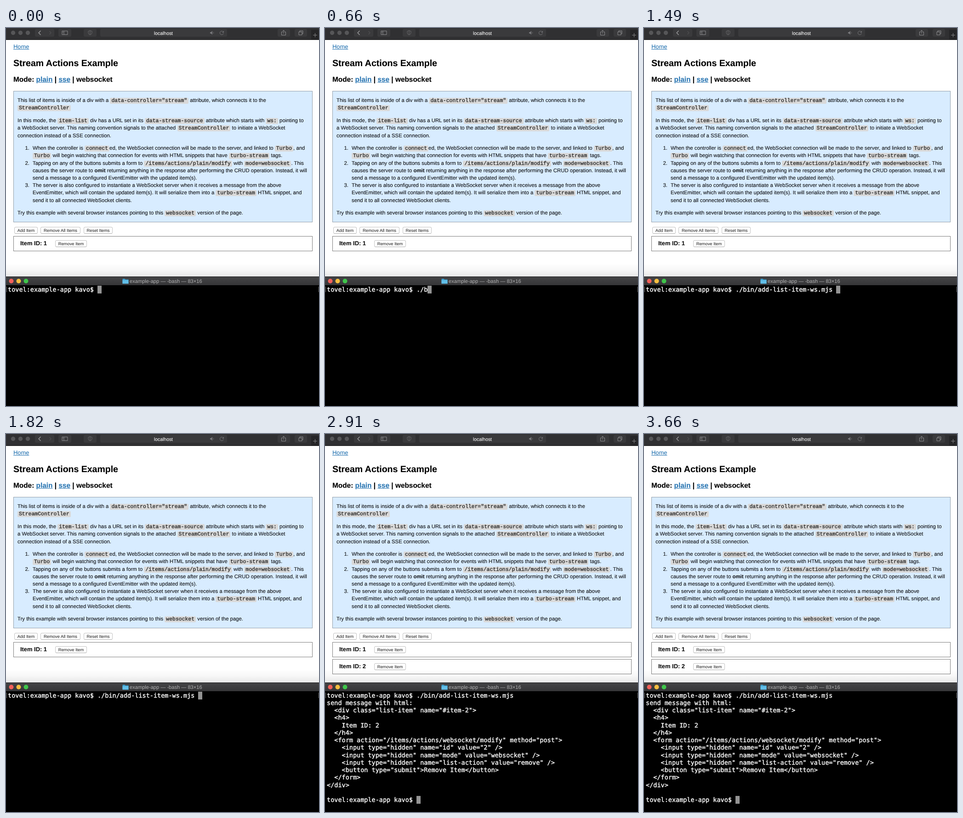
An HTML page that plays this animation: 681 by 823 pixels, repeating every 3.75 s.

```html
<!DOCTYPE html>
<html lang="en">
<head>
<meta charset="utf-8">
<title>Stream Actions Example</title>
<style>
  html, body { margin: 0; width: 100%; height: 100%; overflow: hidden; background: #fff; }
  body {
    position: relative;
    font: 11.36px/16px "Liberation Sans", Arial, sans-serif;
    color: #121416;
    text-rendering: geometricPrecision;
  }
  .stage { position: absolute; left: 0; top: 0; width: 681px; height: 823px; overflow: hidden; }
  .stage * { box-sizing: border-box; }
  .bar { position: absolute; left: 0; top: 0; }

  /* Rows are centred on --y */
  .row {
    position: absolute; left: calc(var(--x, 25) * 1px); top: calc(var(--y) * 1px - 8px);
    height: 16px; white-space: pre; -webkit-text-stroke: .12px;
  }
  .li { --x: 58; }
  .li i { position: absolute; left: -16.5px; font-style: normal; }
  .head { --x: 16; color: #000; font-weight: bold; }
  a { color: #2b77b3; text-decoration: underline; }
  code {
    font: 11.45px/16px "Liberation Mono", "Courier New", monospace;
    -webkit-text-stroke: .35px;
    padding: 0 3px; border-radius: 2px; background: #d9d9d9; color: #2a2a2a;
  }
  .panel {
    position: absolute; left: 16px; top: 137px; width: 651px; height: 286px;
    border: 1px solid #93a0aa; background: #d8ecff;
  }
  .item {
    position: absolute; left: 16px; top: 453px; width: 651px; height: 33px;
    border: 1px solid #7d7d7d; background: #fff;
  }
  .item b { position: absolute; left: 14px; top: 7px; font-size: 12.9px; color: #000; white-space: pre; }
  .btn {
    position: absolute; top: 433px; height: 15px; border: 1px solid #c3c3c3; border-bottom-color: #acacac;
    border-radius: 3.5px; background: #fff; color: #1a1a1a; font-size: 9.4px; line-height: 13px;
    text-align: center; white-space: nowrap;
  }
  .item .btn { left: 90px; top: 8px; width: 69px; }
  .shade {
    position: absolute; left: 0; top: 512px; width: 100%; height: 30px;
    background: linear-gradient(#0000, #00000008 50%, #00000018);
  }

  .title {
    position: absolute; left: 0; top: 541px; width: 100%; height: 19px;
    background: linear-gradient(#434345, #363638); border-top: 1px solid #1b1b1c;
  }
  .title span { position: absolute; left: 269px; top: 2px; font-size: 11.1px; color: #b4b4b5; white-space: pre; }
  .term {
    --w: 8.127px; --h: 16.27px;
    position: absolute; left: 0; top: 560px; width: 100%; height: 263px;
    background: #000; color: #fff;
    font: 13.5px/16.27px "DejaVu Sans Mono", monospace;
    -webkit-text-stroke: .4px;
    animation: type 3750ms step-end infinite;
  }
  .term pre { position: absolute; left: 4px; top: 1.5px; margin: 0; font: inherit; }
  .term .cmd {
    left: calc(4px + 24 * var(--w)); width: calc(var(--n) * var(--w));
    height: var(--h); overflow: hidden;
  }
  .term .out { top: calc(1.5px + var(--h)); }
  .cursor {
    position: absolute; width: 9px; height: 17px; background: #939393;
    left: calc(4px + var(--col) * var(--w)); top: calc(.5px + var(--row) * var(--h));
  }
  .mark { position: absolute; top: 3px; width: 1px; height: 12px; background: #6a6a6a; }
  .done { animation: done 3750ms step-end infinite; }

  @keyframes type {
    0%     { --n: 0;  --col: 24; --row: 0; }
    10.93% { --n: 1;  --col: 25; --row: 0; }
    13.33% { --n: 2;  --col: 26; --row: 0; }
    17.45% { --n: 3;  --col: 27; --row: 0; }
    19.73% { --n: 4;  --col: 28; --row: 0; }
    22.13% { --n: 5;  --col: 29; --row: 0; }
    26.67% { --n: 6;  --col: 30; --row: 0; }
    30.8%  { --n: 7;  --col: 31; --row: 0; }
    39.73% { --n: 27; --col: 51; --row: 0; }
    55.2%  { --n: 27; --col: 0;  --row: 1; }
    59.47%, 100% { --n: 27; --col: 24; --row: 14; }
  }
  @keyframes done {
    0% { visibility: hidden; }
    59.47%, 100% { visibility: visible; }
  }
</style>
</head>
<body>
<div class="stage">
  <svg class="bar" width="681" height="26" fill="none" stroke="#8d8d8f" stroke-width="1">
    <rect width="681" height="26" fill="#303032" stroke="none"/>
    <path d="M0 25.5H681" stroke="#151516"/>
    <g fill="#565658" stroke="none">
      <circle cx="15.5" cy="10.5" r="4.7"/><circle cx="31.5" cy="10.5" r="4.7"/><circle cx="47.5" cy="10.5" r="4.7"/>
    </g>
    <g fill="#3a3a3c" stroke="none">
      <rect x="63" y="2" width="42" height="17" rx="3"/><rect x="114" y="2" width="28" height="17" rx="3"/>
      <rect x="169" y="2" width="28" height="17" rx="3"/><rect x="205" y="2" width="276" height="17" rx="3"/>
      <rect x="591" y="2" width="27" height="17" rx="3"/><rect x="628" y="2" width="27" height="17" rx="3"/>
    </g>
    <path d="M75.5 6l-4.5 4.5 4.5 4.5" stroke="#a5a5a7" stroke-width="1.2"/>
    <path d="M94.5 7l3.5 3.5-3.5 3.5" stroke="#5f5f61"/>
    <path d="M122 6.5h12v8h-12zM126 6.5v8M123.5 8.5h1M123.5 10.5h1"/>
    <path d="M183 5.5l4 1.5v3.5q0 3-4 4.5q-4-1.5-4-4.5v-3.5zM183 5.5v9.5" stroke="#68686a"/>
    <path d="M444 9h2l3-2.5v8l-3-2.5h-2z" fill="#77777a" stroke="none"/>
    <path d="M451 8.5q1.5 2 0 4" stroke="#68686a"/>
    <path d="M473 9a4 4 0 1 0 .3 2.5M473.5 6.5v3h-3" stroke="#77777a"/>
    <path d="M602 8.5h-2.5v7h9v-7h-2.5M604 12v-7M601.8 7l2.2-2.2 2.2 2.2"/>
    <path d="M637 8.5h7v6.5h-7zM639 8v-2h7v6.5h-2"/>
    <rect x="664" y="4" width="17" height="21" fill="#252527" stroke="none"/>
    <path d="M668 15.5h9M672.5 11v9" stroke="#858587"/>
    <text x="342.5" y="14.7" text-anchor="middle" font-size="10.4" fill="#ececec" stroke="#ececec" stroke-width=".15">localhost</text>
  </svg>

  <div class="row" style="--x:16;--y:41;font-size:12.9px"><a>Home</a></div>
  <div class="row head" style="--y:76.6;font-size:19.5px">Stream Actions Example</div>
  <div class="row head" style="--y:113;font-size:15.4px">Mode: <a>plain</a> | <a>sse</a> | websocket</div>

  <div class="panel"></div>
  <div class="row" style="--y:158">This list of items is inside of a div with a <code>data-controller="stream"</code> attribute, which connects it to the</div>
  <div class="row" style="--y:174"><code>StreamController</code></div>
  <div class="row" style="--y:202">In this mode, the <code>item-list</code> div has a URL set in its <code>data-stream-source</code> attribute which starts with <code>ws:</code> pointing to</div>
  <div class="row" style="--y:218">a WebSocket server. This naming convention signals to the attached <code>StreamController</code> to initiate a WebSocket</div>
  <div class="row" style="--y:234.5">connection instead of a SSE connection.</div>
  <div class="row li" style="--y:262"><i>1.</i>When the controller is <code>connect</code>ed, the WebSocket connection will be made to the server, and linked to <code>Turbo</code>, and</div>
  <div class="row li" style="--y:278"><code>Turbo</code> will begin watching that connection for events with HTML snippets that have <code>turbo-stream</code> tags.</div>
  <div class="row li" style="--y:294.6"><i>2.</i>Tapping on any of the buttons submits a form to <code>/items/actions/plain/modify</code> with <code>mode=websocket</code>. This</div>
  <div class="row li" style="--y:311">causes the server route to <b>omit</b> returning anything in the response after performing the CRUD operation. Instead, it will</div>
  <div class="row li" style="--y:327">send a message to a configured EventEmitter with the updated item(s).</div>
  <div class="row li" style="--y:343"><i>3.</i>The server is also configured to instantiate a WebSocket server when it receives a message from the above</div>
  <div class="row li" style="--y:359.3">EventEmitter, which will contain the updated item(s). It will serialize them into a <code>turbo-stream</code> HTML snippet, and</div>
  <div class="row li" style="--y:375.6">send it to all connected WebSocket clients.</div>
  <div class="row" style="--y:403.4">Try this example with several browser instances pointing to this <code>websocket</code> version of the page.</div>

  <div class="btn" style="left:18px;width:51px">Add Item</div>
  <div class="btn" style="left:75px;width:87px">Remove All Items</div>
  <div class="btn" style="left:169px;width:63px">Reset Items</div>

  <div class="item"><b>Item ID: 1</b><div class="btn">Remove Item</div></div>
  <div class="item done" style="top:490px"><b>Item ID: 2</b><div class="btn">Remove Item</div></div>
  <div class="shade"></div>

  <div class="title">
    <svg class="bar" width="300" height="18">
      <circle cx="11.5" cy="9" r="5" fill="#f4605a"/>
      <circle cx="27.5" cy="9" r="5" fill="#f6be40"/>
      <circle cx="43.5" cy="9" r="5" fill="#3fc64b"/>
      <path d="M254 4h4.5l1.5 1.5h6.5v9h-13v-9.5z" fill="#3d9fce"/>
      <path d="M253.5 7h13v7.5h-13z" fill="#62bfe8"/>
    </svg>
    <span>example-app — -bash — 83×16</span>
  </div>

  <div class="term">
    <div class="mark" style="left:1px"></div>
    <div class="mark" style="left:680px"></div>
    <div class="cursor"></div>
    <pre>tovel:example-app kavo$ </pre>
    <pre class="cmd">./bin/add-list-item-ws.mjs </pre>
    <pre class="out done">send message with html:
  &lt;div class="list-item" name="#item-2"&gt;
  &lt;h4&gt;
    Item ID: 2
  &lt;/h4&gt;
  &lt;form action="/items/actions/websocket/modify" method="post"&gt;
    &lt;input type="hidden" name="id" value="2" /&gt;
    &lt;input type="hidden" name="mode" value="websocket" /&gt;
    &lt;input type="hidden" name="list-action" value="remove" /&gt;
    &lt;button type="submit"&gt;Remove Item&lt;/button&gt;
  &lt;/form&gt;
&lt;/div&gt;

tovel:example-app kavo$ </pre>
  </div>
</div>
</body>
</html>
```
